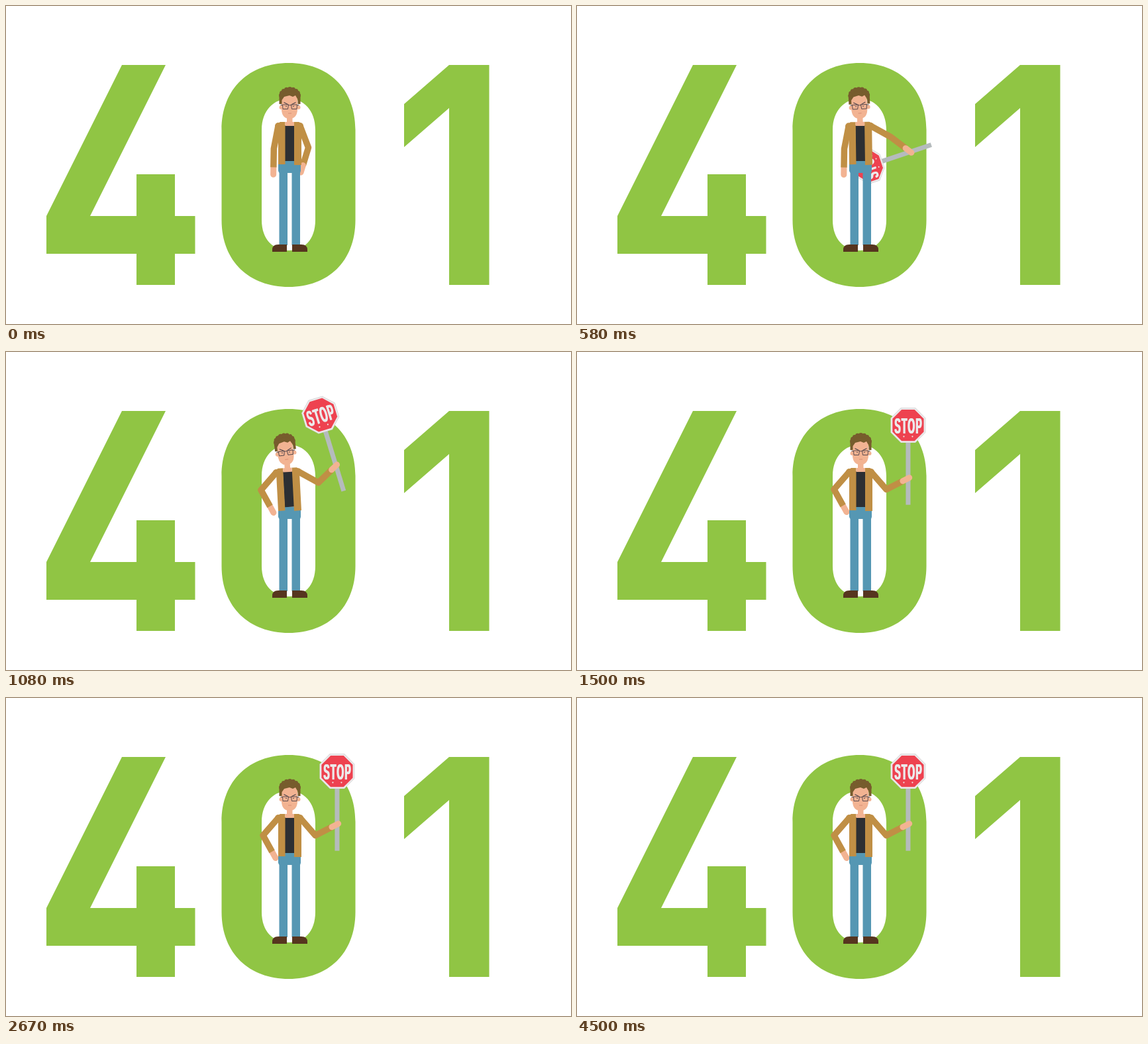
These frames come from a looping animation (853 px wide and 480 px high, 8 s). An HTML page with a canvas:

```html
<!DOCTYPE html>
<html lang="en">
<head>
<meta charset="utf-8">
<title>401</title>
<style>
html, body { margin: 0; width: 853px; height: 480px; overflow: hidden; background: #fff; }
canvas { display: block; }
</style>
</head>
<body>
<canvas id="stage" width="853" height="480"></canvas>
<script>
const ctx = document.getElementById('stage').getContext('2d');
const LOOP = 8000, FPS = 12;
const GREEN = '#90c544', JACKET = '#c08f45', SHIRT = '#2c2f33', JEANS = '#5597b3',
  SKIN = '#f2b392', HAIR = '#775c2d', SHOE = '#56351f', RED = '#ee4250',
  PALE = '#eceaeb', POLE = '#b5bbbd', FRAME = '#4a4048';
const UPPER_ARM = 35, WRIST = 28, HAND = 37, GRIP = 80;

const digits = new Path2D(
  'M175 89H241L127 317H197V254H255V317H285.5V374H255V421H197V374H61V317Z' +
  'M325.5 187C325.5 124 368 86 427 86S527.5 124 527.5 187V323C527.5 386 486 424 427 424S325.5 386 325.5 323Z' +
  'M386 187V323C386 353 404 369 427 369S467 353 467 323V187C467 157 449 140 427 140S386 157 386 187Z' +
  'M669 89H729.5V421H669V154L601 213V148Z');
const jeans = new Path2D('M411 234H445V249L444 252V361H431.5V252H425V361H412.5V252L411 249Z');
const shoes = new Path2D('M402 371V368Q402 360 411 360H424V371ZM432 371V360H446Q455 360 455 368V371Z');
const jacket = new Path2D('M414 175H442Q446 176 446 182V240H435V175H421.5V239H411V182Q411 176 414 175Z');
const face = new Path2D('M416 134H440V157Q439 170 428 170T416 157Z');
const hair = new Path2D('M412.5 148V134Q414 125 428.5 125T444.5 134V148H440.5V141L437 135L433 137L428 135L420 137L416.5 142V148Z');

const rad = deg => deg * Math.PI / 180;
const progress = (f, from, to) => Math.min(1, Math.max(0, (f - from) / (to - from)));
const smooth = (f, from, to) => {
  const k = progress(f, from, to);
  return k * k * (3 - 2 * k);
};
const polar = ([x, y], length, deg) => [x + length * Math.cos(rad(deg)), y + length * Math.sin(rad(deg))];

function fill(color, path, rule) {
  ctx.fillStyle = color;
  ctx.fill(path, rule);
}

function rect(color, ...box) {
  ctx.fillStyle = color;
  ctx.fillRect(...box);
}

function dot(color, x, y, r) {
  ctx.fillStyle = color;
  ctx.beginPath();
  ctx.arc(x, y, r, 0, 7);
  ctx.fill();
}

function line(color, width, points, cap = 'butt') {
  ctx.strokeStyle = color;
  ctx.lineWidth = width;
  ctx.lineCap = cap;
  ctx.lineJoin = 'round';
  ctx.beginPath();
  points.forEach(p => ctx.lineTo(...p));
  ctx.stroke();
}

function octagon(color, half) {
  const path = new Path2D();
  for (let deg = 22.5; deg < 360; deg += 45) path.lineTo(...polar([0, 0], half / Math.cos(rad(22.5)), deg));
  path.closePath();
  fill(color, path);
}

function turn(x, y, deg) {
  ctx.translate(x, y);
  ctx.rotate(rad(deg));
  ctx.translate(-x, -y);
}

// Shoulder position after the torso leans about the waist
function shoulder(x, lean) {
  const a = rad(lean), dx = x - 428, dy = -59;
  return [428 + dx * Math.cos(a) - dy * Math.sin(a), 240 + dx * Math.sin(a) + dy * Math.cos(a)];
}

function makeArm(start, upper, fore) {
  const elbow = polar(start, UPPER_ARM, upper);
  return { start, elbow, wrist: polar(elbow, WRIST, fore), hand: polar(elbow, HAND, fore), tip: polar(elbow, HAND + 2, fore) };
}

function drawSleeve({ start, elbow, wrist }) {
  dot(JACKET, ...start, 5);
  line(JACKET, 9.5, [start, elbow, wrist]);
}

function drawHand({ wrist, tip }) {
  line(SKIN, 9, [wrist, tip], 'round');
}

function drawSign([x, y], angle, flat, size) {
  if (!size) return;
  ctx.save();
  ctx.translate(x, y);
  ctx.rotate(rad(angle));
  ctx.scale(size, size * flat);
  ctx.translate(0, -GRIP);
  rect(POLE, -3.5, 24, 7, 96);
  octagon('#d3d3d5', 26.5);
  octagon(PALE, 25.8);
  octagon(RED, 23.6);
  for (const bolt of [-6.5, 6.5]) dot(PALE, bolt, 17, 1.1);
  ctx.fillStyle = PALE;
  ctx.font = 'bold 33px "Liberation Sans", Arial, sans-serif';
  ctx.letterSpacing = '3px';
  ctx.textAlign = 'center';
  ctx.scale(.42, 1);
  for (const dx of [0, 3]) ctx.fillText('STOP', dx, 12);
  ctx.restore();
}

function drawHead() {
  for (const x of [415.5, 441.5]) dot(SKIN, x, 153, 3);
  fill(SKIN, face);
  fill(HAIR, hair);
  for (let deg = 180; deg <= 360; deg += 22.5) {
    dot(HAIR, 428.5 + 13 * Math.cos(rad(deg)), 135 + 9.5 * Math.sin(rad(deg)), 3.4);
  }
  for (const side of [-1, 1]) {
    const at = d => 428.5 + side * d;
    line(FRAME, 1.1, [[at(9), 145.5], [at(3), 148.5]]);
    line(FRAME, .9, [[at(0), 150], [at(2), 149], [at(11), 149], [at(10.5), 155.5], [at(3), 155.5], [at(2), 149]]);
    line(FRAME, .9, [[at(11), 149.5], [at(14), 149.5]]);
    dot(FRAME, at(5.5), 151.5, .8);
  }
  line('#d98f75', 1, [[426, 162], [431, 162]]);
}

function drawTorso(lean, nod) {
  ctx.save();
  turn(428, 240, lean);
  rect(SHIRT, 421, 180, 15, 54);
  fill(JACKET, jacket);
  rect(SKIN, 421.5, 175, 13.5, 6);
  rect(SKIN, 424, 165, 8.5, 12);
  turn(428, 172, nod);
  drawHead();
  ctx.restore();
}

// Reach behind the back, swing the sign up, then settle upright
function draw(f) {
  const reach = smooth(f, 0, 5), raise = smooth(f, 5, 10.5), settle = smooth(f, 13, 18);
  const flip = progress(f, 5, 10.2) ** 3;
  const tilt = smooth(f, 5, 9) - settle;
  const lean = reach - raise - 3 * tilt;
  const bend = 5 + 30 * smooth(f, 8, 12);

  const left = makeArm(shoulder(411, lean), 96 + bend, 96 - bend);
  const right = makeArm(shoulder(444, lean),
    69 - 40 * reach + 20 * settle,
    107 - 35 * reach - 116 * raise + 17 * settle);
  const angle = -114 + 97 * flip + 17 * settle;
  const flat = .84 + .16 * flip - .55 * Math.sin(Math.PI * flip) ** 2;

  ctx.clearRect(0, 0, 853, 480);
  fill(GREEN, digits, 'evenodd');
  drawHand(left);
  drawSleeve(left);
  drawSleeve(right);
  drawSign(right.hand, angle, flat, reach);
  drawHand(right);
  fill(JEANS, jeans);
  fill(SHOE, shoes);
  drawTorso(lean, -4 * tilt);
}

function tick() {
  const t = performance.now() % LOOP;
  draw(Math.floor((t + 4) * FPS / 1000));
  requestAnimationFrame(tick);
}
tick();
</script>
</body>
</html>
```
